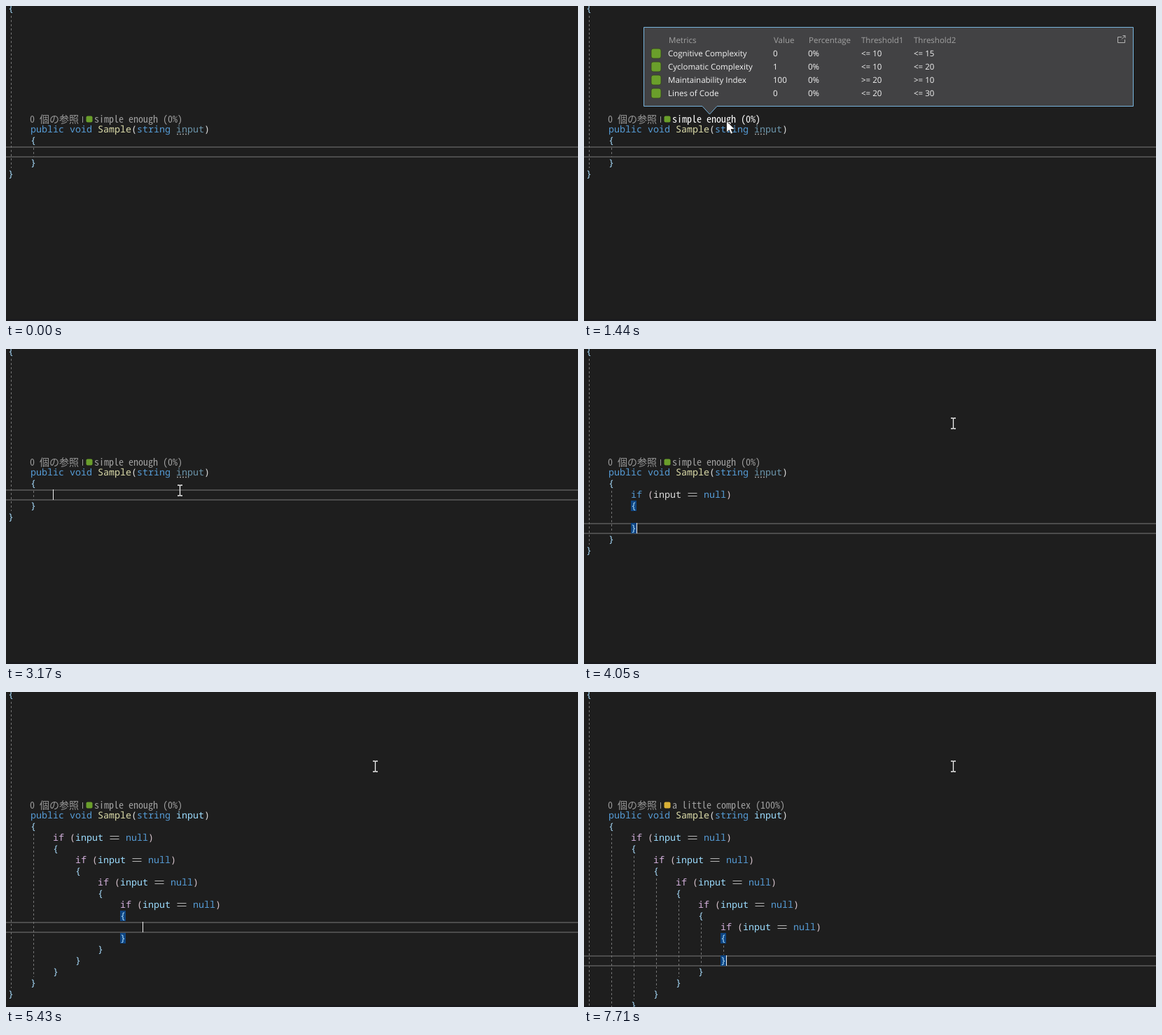
An HTML page for the animation above (8000 ms loop, 817 px wide and 451 px high).

```html
<!DOCTYPE html>
<html lang="ja">
<head>
<meta charset="utf-8">
<style>
html, body { margin: 0; width: 100%; height: 100%; overflow: hidden; background: #1e1e1e; }
svg { display: block; width: 817px; height: 451px; }
text { white-space: pre; }
.code { font: 13.333px "Noto Sans Mono", "DejaVu Sans Mono", monospace; text-rendering: geometricPrecision; }
.lens { font: 14px "Noto Sans Mono CJK JP", "Noto Sans CJK JP", monospace; font-weight: 300; }
.tip { font: 11.5px "Open Sans", "Noto Sans", sans-serif; text-rendering: geometricPrecision; }
</style>
</head>
<body>
<svg viewBox="0 0 817 451">
  <rect width="817" height="451" fill="#1e1e1e"/>
  <rect y="448" width="817" height="3" fill="#1a1a1d"/>
  <g id="code" class="code"></g>
  <g id="lens" class="lens"></g>
  <g id="popup" class="tip"></g>
  <g id="mouse">
    <path id="arrow" d="M0 0V16.5L3.8 13L6.3 18.8L9 17.6L6.5 12H11.8Z" fill="#fff" stroke="#111" stroke-width=".8"/>
    <path id="beam" d="M-3.5 -7.5H-1L0 -7L1 -7.5H3.5M0 -7V7M-3.5 7.5H-1L0 7L1 7.5H3.5" fill="none" stroke="#f2f2f2" stroke-width="1.3"/>
  </g>
</svg>
<script>
const LOOP = 8000;
const BLUE = '#569cd6', LIGHT = '#9cdcfe', PLAIN = '#dcdcdc', BRACE = '#a5d8f7';
const GREEN = '#6a9f2b', YELLOW = '#d9b035';
const PASTE = [3920, 4350, 4800, 5250, 5560];
const UP = [4200, 4650, 5120, 5430, Infinity];
const CLICK = 2980;
// time, x, y
const PATH = [[210, 782, 440], [900, 206, 169], [1240, 203, 164], [2330, 203, 164],
  [2620, 223, 217], [2880, 231, 208], [3130, 231, 208], [3410, 527, 106]];

const $ = id => document.getElementById(id);
const esc = s => s.replace(/</g, '&lt;').replace(/>/g, '&gt;');
const text = (x, y, s, fill) => `<text x="${x}" y="${y}" fill="${fill}">${esc(s)}</text>`;
const rect = (x, y, w, h, fill, extra = '') =>
  `<rect x="${x}" y="${y}" width="${w}" height="${h}" fill="${fill}" ${extra}/>`;
const colX = c => 3 + 8 * c;
const rowY = r => 177 + 16 * r;
const tok = (c, r, s, fill) => text(colX(c), rowY(r) + 4, s, fill);
const guide = (c, y1, y2) =>
  `<path d="M${colX(c) + 4.5} ${y1}V${y2}" stroke="#747474" stroke-dasharray="3 3"/>`;
const blockGuide = (c, open, close) => guide(c, rowY(open) + 10, rowY(close) - 9);

function condition(k, fresh) {
  const c = 4 + 4 * k, r = 2 * k, x = colX(c + 10), y = rowY(r);
  return tok(c, r, 'if', fresh ? BLUE : '#d3b0dc') + tok(c + 3, r, '(', '#d6c3cc') +
    tok(c + 4, r, 'input', fresh ? PLAIN : LIGHT) + tok(c + 13, r, 'null', BLUE) +
    tok(c + 17, r, ')', '#d6c3cc') +
    `<path d="M${x + 1.5} ${y - 2.5}h13m0 4h-13" stroke="#b8b8b8" fill="none"/>`;
}

function drawCode(s) {
  const { n, up, lit, caret, guides, used, fresh } = s;
  const end = 3 * n + 3;
  const row = n && !up ? 2 * n + 3 : 2 * n + 2;
  const caretX = n && !up ? colX(5 + 4 * n) : colX(8 + 4 * n);
  let out = rect(-2, rowY(row) - 8, 821, 2, '#4c4c4c') + rect(-2, rowY(row) + 6, 821, 2, '#4c4c4c');
  if (lit) for (const r of [2 * n + 1, 2 * n + 3])
    out += rect(colX(4 + 4 * n), rowY(r) - 8, 8, 15, '#0e4583');

  out += text(3, 8, '{', BRACE) + guide(0, 14, rowY(end + 1) - 9) + blockGuide(4, 1, end);
  out += tok(4, 0, 'public', BLUE) + tok(11, 0, 'void', BLUE) + tok(16, 0, 'Sample', '#dcdcaa') +
    tok(22, 0, '(', PLAIN) + tok(23, 0, 'string', BLUE) +
    tok(30, 0, 'input', used ? LIGHT : '#6c95ab') + tok(35, 0, ')', PLAIN);
  if (!used) out += '<path d="M244 183.5H261" stroke="#a0a0a0" stroke-width="1.5" stroke-dasharray="2 2"/>';
  out += tok(4, 1, '{', BRACE) + tok(4, end, '}', BRACE) + tok(0, end + 1, '}', BRACE);

  for (let k = 1; k <= n; k++) {
    const c = 4 + 4 * k;
    out += condition(k, fresh && k === n) + tok(c, 2 * k + 1, '{', BRACE) + tok(c, end - k, '}', BRACE);
    if (guides) out += blockGuide(c, 2 * k + 1, end - k);
  }
  if (caret) out += rect(caretX, rowY(row) - 8, 1, 15, '#f0f0f0');
  return out;
}

function drawLens(s) {
  const label = s.complex ? 'a little complex (100%)' : 'simple enough (0%)';
  return text(34, 167, '0 個の参照', '#999') + rect(109, 158, 1, 9, '#999') +
    rect(114.5, 157.5, 9, 9, s.complex ? YELLOW : GREEN, 'rx="2"') +
    text(126, 167, label, s.hover ? '#fff' : '#a0a0a0');
}

function drawPopup() {
  const cols = [120, 270, 320, 396, 471];
  const rows = [
    ['Cognitive Complexity', '0', '0%', '<= 10', '<= 15'],
    ['Cyclomatic Complexity', '1', '0%', '<= 10', '<= 20'],
    ['Maintainability Index', '100', '0%', '>= 20', '>= 10'],
    ['Lines of Code', '0', '0%', '<= 20', '<= 30']];
  let out = '<path d="M85.5 30.5H784.5V143.5H190L179.5 155L169 143.5H85.5Z" fill="#424244" stroke="#78b4dc"/>';
  ['Metrics', 'Value', 'Percentage', 'Threshold1', 'Threshold2'].forEach((h, i) => {
    out += text(cols[i] + (i < 3 ? 1 : 0), 53, h, '#a2a2a2');
  });
  rows.forEach((cells, i) => {
    const y = 72 + 19 * i;
    out += rect(96, y - 11, 14, 14, GREEN, 'rx="3" stroke="#35431f" stroke-width=".8"');
    cells.forEach((s, j) => { out += text(cols[j], y, s, '#f4f4f4'); });
  });
  return out + '<path d="M768 44.5H762.5V52.5H772.5V48M768 47.5L773 42.5M769.5 42.5H773V46" fill="none" stroke="#b4b4b4"/>';
}

function caretOn(t) {
  if (t < CLICK) return false;
  if (t < PASTE[0]) return t < 3400;
  if (t < 6150) return true;
  return (t >= 6690 && t < 7180) || t >= 7710;
}

function stateAt(t) {
  const n = PASTE.filter(p => t >= p).length;
  const age = n ? t - PASTE[n - 1] : 0;
  return {
    n,
    up: n > 0 && t >= UP[n - 1],
    lit: n > 0 && age >= 130,
    fresh: age < (n === 5 ? 360 : 160),
    caret: caretOn(t),
    guides: t >= 7180,
    used: t >= 4600,
    hover: t >= 870 && t < CLICK,
    complex: t >= 6350
  };
}

function mouseAt(t) {
  let i = 0;
  while (i < PATH.length - 2 && t >= PATH[i + 1][0]) i++;
  const [t0, x0, y0] = PATH[i], [t1, x1, y1] = PATH[i + 1];
  const p = Math.min(1, Math.max(0, (t - t0) / (t1 - t0)));
  const e = p * p * (3 - 2 * p);
  return [Math.round(x0 + (x1 - x0) * e), Math.round(y0 + (y1 - y0) * e)];
}

const show = (el, on) => el.setAttribute('visibility', on ? 'visible' : 'hidden');
let lastKey = '';

function render(t) {
  const s = stateAt(t), key = JSON.stringify(s);
  if (key !== lastKey) {
    $('code').innerHTML = drawCode(s);
    $('lens').innerHTML = drawLens(s);
    lastKey = key;
  }
  show($('popup'), t >= 1435 && t < CLICK);
  const [x, y] = mouseAt(t);
  const arrow = y < 172 && t < 2600;
  show($('arrow'), t >= 210 && arrow);
  show($('beam'), t >= 210 && !arrow);
  $('mouse').setAttribute('transform', `translate(${x + .5} ${y + .5})`);
}

$('popup').innerHTML = drawPopup();
const start = performance.now();
function tick() {
  render((performance.now() - start) % LOOP);
  requestAnimationFrame(tick);
}
tick();
</script>
</body>
</html>
```
